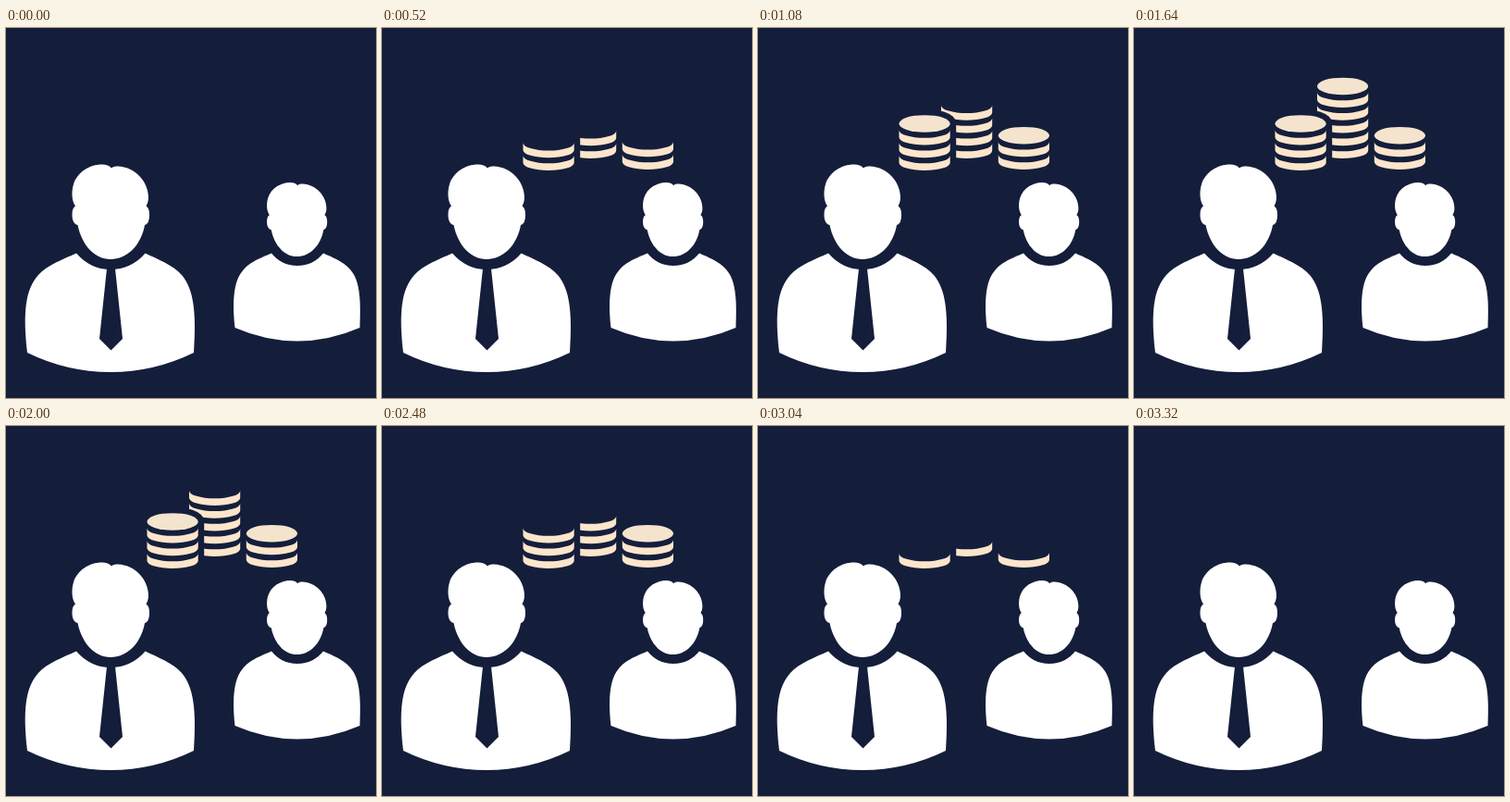
These frames come from a looping animation (400 by 400 pixels, 3800 ms). An HTML page:

```html
<!DOCTYPE html>
<html lang="en">
<head>
<meta charset="utf-8">
<title>Coin stacks</title>
<style>
  html, body { margin: 0; width: 100%; height: 100%; overflow: hidden; background: #141e3b; }
  svg { display: block; width: 100vw; height: 100vh; }
</style>
</head>
<body>
<svg viewBox="0 0 400 400">
  <defs>
    <path id="head" d="M113 250C96 250 82 235 77.500 213C73 212 71.500 207 71.500 202C71.500 197 72.500 194 75 192.500C71 187 70.500 177 73 169C77 156 90 147.500 104 147.500C108 147.500 112 149 114 151.500C115.500 150 118 149.500 121 149.500C139 150 154 166 154 183C154 187 153 190 151.500 192.500C154 194 155 197 155 202C155 208 153.500 212 150 213C146 235 131 250 113 250Z"/>
  </defs>
  <g fill="#fff">
    <use href="#head"/>
    <path d="M76 243.500C86 255 98 261 113 261C128 261 141 255 150.500 243.500C164 250 180 256 190 267C203 282 206 308 203 351Q160 372 113 372Q66 372 23 351C18 308 21 282 35 267C45 256 62 250 76 243.500Z"/>
    <use href="#head" transform="translate(226.300 52) scale(.78)"/>
    <path d="M287 243.500C294 252 303 257 315 257C327 257 336 252 343 243.500C353 248 364 252 372 261C382 272 384 291 382.500 324Q349 338.500 315 338.500Q281 338.500 247.500 324C244 291 247 272 257 261C265 252 277 248 287 243.500Z"/>
  </g>
  <path fill="#141e3b" d="M109 260H118L126 336L113.500 348.500L101 336Z"/>
  <g id="coins"></g>
</svg>
<script>
  const LOOP = 3800;
  const RX = 27.6, SAG = 8.3, RIM = 7.7, STEP = 13.75, FACE = 9.3;
  // When each level appears and disappears, bottom level first.
  const LEVELS = [[240, 3320], [520, 3040], [800, 2760], [1080, 2480], [1360, 2240], [1640, 2000]];
  const coins = document.getElementById('coins');

  function add(tag, attrs) {
    const el = document.createElementNS('http://www.w3.org/2000/svg', tag);
    for (const key in attrs) el.setAttribute(key, attrs[key]);
    return coins.appendChild(el);
  }

  function show(el, [on, off]) {
    el.animate([
      { opacity: 0, offset: 0, easing: 'steps(1, end)' },
      { opacity: 1, offset: on / LOOP, easing: 'steps(1, end)' },
      { opacity: 0, offset: off / LOOP, easing: 'steps(1, end)' },
      { opacity: 0, offset: 1 }
    ], { duration: LOOP, iterations: Infinity });
  }

  function stack(cx, base, count) {
    for (let i = 0; i < count; i++) {
      const y = base - i * STEP - SAG - RIM;
      const d = `M${cx - RX} ${y}a${RX} ${SAG} 0 0 0 ${2 * RX} 0v${RIM}a${RX} ${SAG} 0 0 1 ${-2 * RX} 0z`;
      show(add('path', { d, fill: '#fce5cb' }), LEVELS[i]);
    }
    const cy = base - count * STEP - FACE;
    show(add('ellipse', { cx, cy, rx: RX, ry: FACE, fill: '#f4e4ce' }), LEVELS[count]);
  }

  // Dark margin that keeps the front stack apart from the one behind.
  function margin(cx, base, count) {
    const top = base - count * STEP - FACE, bottom = base - SAG;
    const d = `M${cx - RX} ${top}a${RX} ${FACE} 0 0 1 ${2 * RX} 0V${bottom}a${RX} ${SAG} 0 0 1 ${-2 * RX} 0z`;
    add('path', { d, fill: '#141e3b', stroke: '#141e3b', 'stroke-width': 13 });
  }

  stack(225.6, 141, 5);
  margin(180.1, 154, 3);
  // Restore the hair that the margin may touch.
  stack(180.1, 154, 3);
  stack(287.4, 153, 2);
</script>
</body>
</html>
```
